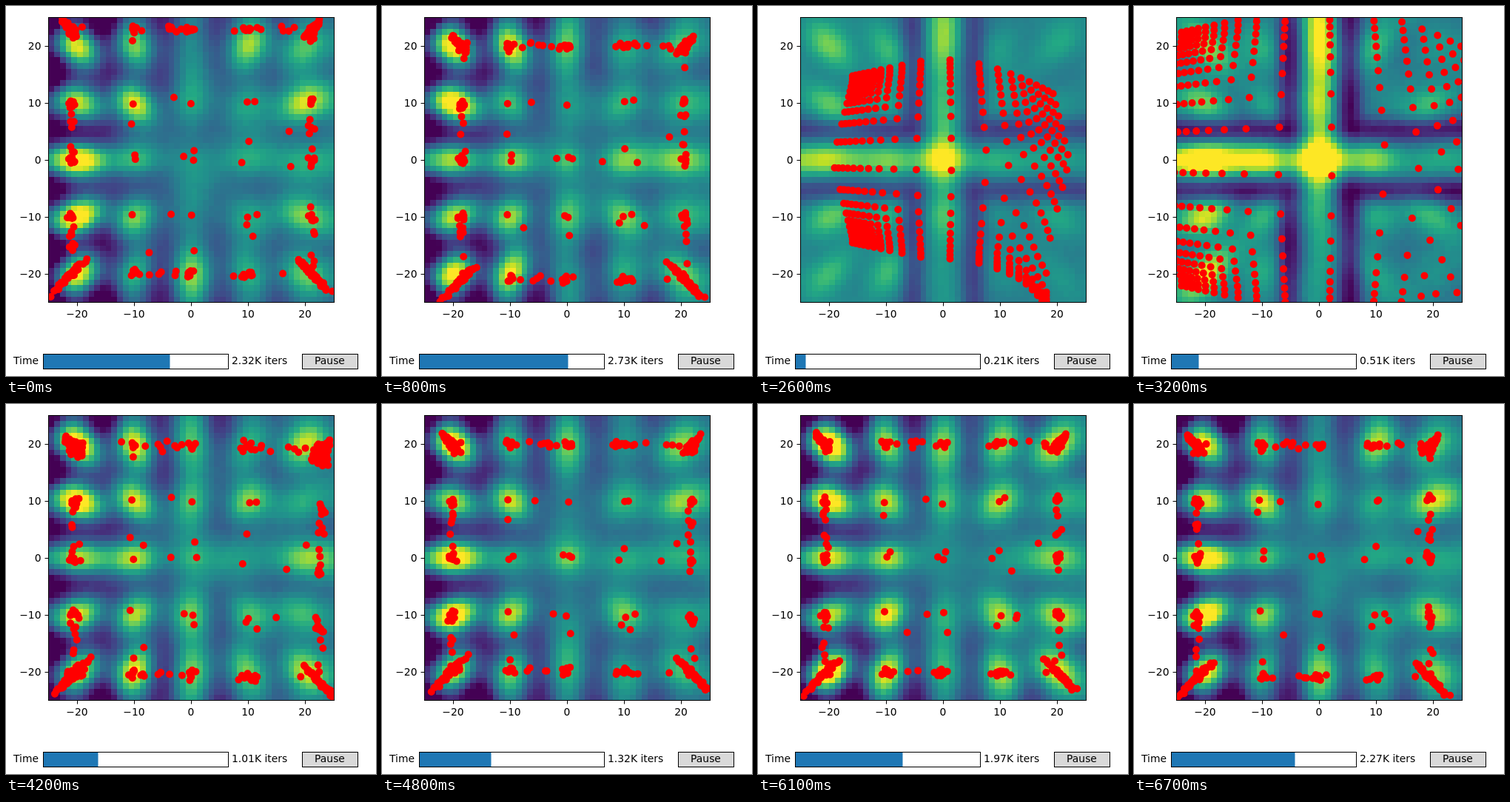
These frames come from a looping animation (500 by 500 pixels, 6800 ms). An HTML page with a canvas:

```html
<!DOCTYPE html>
<html lang="en">
<head>
<meta charset="utf-8">
<title>Generator training</title>
<style>
  html, body { margin: 0; width: 100%; height: 100%; overflow: hidden; background: #fff; }
  canvas, svg { position: absolute; left: 0; top: 0; }
  text { font: 13.889px "DejaVu Sans", sans-serif; }
</style>
</head>
<body>
<canvas id="plot" width="500" height="500"></canvas>
<svg width="500" height="500">
  <g id="axes" fill="none" stroke="#000"><rect x="57.5" y="15.5" width="386" height="385"/></g>
  <rect id="bar" x="50.5" y="470.5" height="20" fill="#1f77b4"/>
  <rect x="50.5" y="470.5" width="250" height="20" fill="none" stroke="#000"/>
  <rect x="400.5" y="470.5" width="75" height="20" fill="#d9d9d9" stroke="#000"/>
  <text x="10" y="484">Time</text>
  <text id="iters" x="305" y="484"></text>
  <text x="437.5" y="484" text-anchor="middle">Pause</text>
</svg>
<script>
const STEP = 100, STEPS = 68, START = 46, UNIT = 7.7, SIDE = 50, GRID = 20;
const MODES = [-20, -10, 0, 10, 20];
const $ = id => document.getElementById(id);
const ctx = $('plot').getContext('2d');
const px = x => 250 + x * UNIT, py = y => 208 - y * UNIT;
const lerp = (a, b, f) => a + (b - a) * f;
const clamp = (v, lo, hi) => Math.min(hi, Math.max(lo, v));
const bell = (d, w) => Math.exp(-d * d / (2 * w * w));
const noise = n => { const s = Math.sin(n * 127.1 + 3.7) * 43758.5453; return (s - Math.floor(s)) * 2 - 1; };

// the unfolding grid of samples gives way to the 25 modes
const youth = step => Math.exp(-Math.max(0, step - 10) / 4.5);
const growth = step => 1 - (1 - clamp(step / 10, 0, 1)) ** 2;

// step, then where the outer samples gather: left, right, top, bottom
const drift = [
  [20, -20.3, 22.4, 19.4, -20.3], [32, -20, 21, 20.5, -19.2], [45, -21.4, 19.4, 19.7, -21],
  [46, -21, 21.2, 22.9, -20], [54, -18.5, 20.6, 20, -21], [65, -20, 19.3, 20.5, -19]
];

function edges(step) {
  const next = drift.findIndex(d => d[0] > step);
  if (next <= 0) return drift.at(next).slice(1);
  const a = drift[next - 1], b = drift[next];
  return a.map((v, n) => lerp(v, b[n], (step - a[0]) / (b[0] - a[0]))).slice(1);
}

// ---- score field ----

// dark lanes run between the modes, deepest at the left edge
function floorScore(x, y) {
  const f = (x + 25) / 50;
  const lanes = Math.sin(Math.PI * y / 10) ** 2 * Math.abs(x) + Math.sin(Math.PI * x / 10) ** 2 * Math.abs(y);
  return lerp(.36, .55, f) - lerp(.44, .12, f) * lanes / 25;
}

// peaks stretch away from the centre and pulse at their own pace
function peaks(step) {
  return MODES.flatMap(x => MODES.map(y => {
    const n = x * 3 + y, r = Math.hypot(x, y);
    const mean = .6 + Math.max(-.022 * x, .008 * x) + .003 * Math.abs(y);
    const pulse = .16 * Math.sin(step * (.3 + .1 * noise(n)) + 9 * noise(n + 40));
    return { x, y, amp: mean + pulse - floorScore(x, y), c: r ? x / r : 1, s: r ? y / r : 0,
      w: 1.8 + .07 * r, h: 1.8 + .01 * r };
  }));
}

function beam(across, along) {
  return (.3 - .009 * along) * bell(across, 1.8)
    - .36 * bell(Math.abs(across) - 5.3, 1.5) * Math.min(1, Math.abs(along) / 9);
}

const cross = (x, y) => .42 + .5 * bell(Math.hypot(x, y), 2.8) + beam(y, x) + beam(x, -y);

function score(x, y, step, spots) {
  const young = youth(step);
  const ripple = .06 * Math.sin(x * .33 + step * .3) * Math.sin(y * .37 - step * .21);
  const ground = lerp(floorScore(x, y), cross(x, y), young) + ripple + .012 * noise(x * 51 + y);
  const glow = spots.reduce((sum, b) => {
    const dx = x - b.x, dy = y - b.y;
    return sum + b.amp * bell(dx * b.c + dy * b.s, b.w) * bell(dy * b.c - dx * b.s, b.h);
  }, 0);
  return lerp(.45, ground + glow * (1 - .35 * young), growth(step));
}

// ---- samples ----

// maps a mode coordinate 0..4 to the axis, lingering at whole numbers
function stair(s, lo, hi) {
  for (let n = 0; n < 2; n++) s -= Math.sin(2 * Math.PI * s) / (2 * Math.PI) * .9;
  s = clamp(s, 0, 4);
  return s < 1 ? lerp(lo, -10, s) : s > 3 ? lerp(10, hi, s - 3) : (s - 2) * 10;
}

function fan(p, q) {
  let x = (p < 0 ? 9 : 10.5) * Math.asinh(p), y = 9 * Math.asinh(q);
  y -= .03 * Math.max(.3, 1 - .07 * Math.abs(q)) * Math.max(0, x) ** 2;
  x *= 1.1 - .008 * Math.min(25, Math.abs(y));
  y *= 1 - .008 * Math.max(0, -x - 4);
  return [x, y];
}

function sample(i, j, step, [left, right, top, bottom]) {
  const id = i * GRID + j, p = i - 9.8, q = 9.7 - j;
  const wobble = n => noise(id + n) + .5 * noise(id + n + step * 31);
  const sx = 2 + .65 * p + .16 * wobble(500), sy = 2 + .65 * q + .16 * wobble(900);
  let x = stair(clamp(sx, 0, 4), left, right), y = stair(clamp(sy, 0, 4), bottom, top);
  const outX = Math.abs(sx - 2) - 2, outY = Math.abs(sy - 2) - 2;
  const corner = outX > 0 && outY > 0;
  if (corner) {
    const t = ((outX + outY) / 4 - 1) * (y > 0 ? 1.5 : 3.2);
    x += Math.sign(x) * t;
    y += Math.sign(y) * t;
  }
  const loose = corner ? .3 : .5;
  x += loose * wobble(1700);
  y += loose * wobble(2100);
  const [fx, fy] = fan(p, q), young = youth(step), size = lerp(.05, 1, growth(step));
  return [lerp(x, fx, young) * size, lerp(y, fy, young) * size];
}

// ---- drawing ----

const viridis = ['440154', '482475', '414487', '355f8d', '2a788e', '21918c', '22a884', '44bf70', '7ad151', 'bddf26', 'fde725']
  .map(h => [0, 2, 4].map(n => parseInt(h.slice(n, n + 2), 16)));
const heat = document.createElement('canvas');
heat.width = heat.height = SIDE;
const hctx = heat.getContext('2d'), cells = hctx.createImageData(SIDE, SIDE);

function drawHeat(step) {
  const spots = peaks(step);
  for (let n = 0; n < SIDE * SIDE; n++) {
    const v = score(n % SIDE - 24.5, 24.5 - Math.floor(n / SIDE), step, spots);
    const s = clamp(v, 0, 1) * 10, lo = Math.min(9, Math.floor(s));
    for (let ch = 0; ch < 3; ch++) cells.data[n * 4 + ch] = lerp(viridis[lo][ch], viridis[lo + 1][ch], s - lo);
    cells.data[n * 4 + 3] = 255;
  }
  hctx.putImageData(cells, 0, 0);
  ctx.drawImage(heat, 57.5, 15.5, 386, 385);
}

function drawSamples(step) {
  const bounds = edges(step);
  ctx.fillStyle = '#f00';
  ctx.beginPath();
  for (let n = 0; n < GRID * GRID; n++) {
    const [x, y] = sample(Math.floor(n / GRID), n % GRID, step, bounds);
    ctx.moveTo(px(x) + 5, py(y));
    ctx.arc(px(x), py(y), 5, 0, 7);
  }
  ctx.fill();
}

function draw(step) {
  ctx.clearRect(0, 0, 500, 500);
  ctx.save();
  ctx.beginPath();
  ctx.rect(57.5, 15.5, 386, 385);
  ctx.clip();
  ctx.imageSmoothingEnabled = false;
  drawHeat(step);
  drawSamples(step);
  ctx.restore();
  $('bar').setAttribute('width', Math.floor(250 * step / (STEPS - 1)));
  $('iters').textContent = ((6 + 50.36 * step) / 1000).toFixed(2) + 'K iters';
}

$('axes').insertAdjacentHTML('beforeend', MODES.map(m => {
  const x = Math.floor(px(m)) + .5, y = Math.floor(py(m)) + .5, label = String(m).replace('-', '\u2212');
  return `<path d="M${x} 400.5v5M57.5 ${y}h-5"/><g fill="#000" stroke="none">
    <text x="${px(m)}" y="420.5" text-anchor="middle">${label}</text>
    <text x="47.5" y="${py(m) + 5}" text-anchor="end">${label}</text></g>`;
}).join(''));

let shown = -1;
function tick() {
  const step = (START + Math.floor(performance.now() / STEP)) % STEPS;
  if (step !== shown) draw(shown = step);
  requestAnimationFrame(tick);
}
tick();
</script>
</body>
</html>
```
